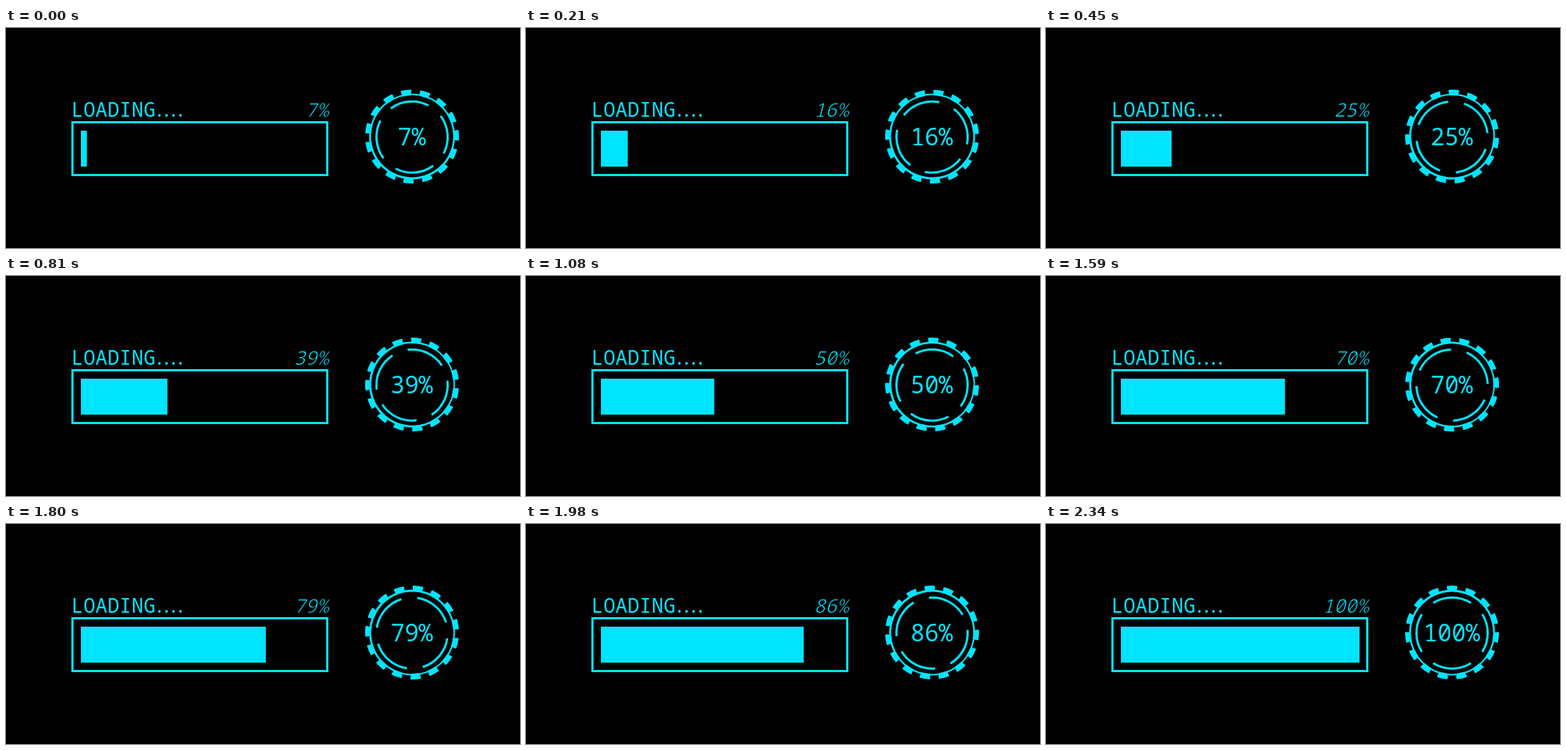
Write an HTML page that moves like this. It is 700x300 px and loops after 2.71 s.

```html
<!DOCTYPE html>
<html lang="en">
<head>
<meta charset="utf-8">
<title>Loading</title>
<style>
  html, body { margin: 0; width: 100%; height: 100%; overflow: hidden; background: #000; }
  svg { display: block; width: 700px; height: 300px; fill: #00e5ff; }
  text { font-family: "Noto Sans Mono", "DejaVu Sans Mono", monospace; }
  .line { fill: none; stroke: #00e5ff; stroke-width: 3; }
  .title { font-size: 27px; letter-spacing: .2px; }
  .dots { letter-spacing: -6.6px; }
  .side { font-size: 26px; font-weight: 200; font-style: italic; text-anchor: end; stroke: #000; stroke-width: .7px; }
  .center { font-size: 32px; text-anchor: middle; }
</style>
</head>
<body>
<svg viewBox="0 0 700 300">
  <text class="title" x="89" y="121">LOADING<tspan class="dots" dx="-3">....</tspan></text>
  <text class="side" id="side" x="439" y="121"></text>
  <rect class="line" x="90.5" y="128.5" width="347" height="72"/>
  <rect id="bar" x="102" y="140" height="49"/>
  <g transform="translate(553 148)">
    <g id="gear">
      <path fill-rule="evenodd" d="M0-58.5a58.5 58.5 0 1 0 .01 0zM0-56.5a56 56 0 1 0 .01 0z"/>
    </g>
    <g id="arcs" class="line"></g>
  </g>
  <text class="center" id="center" x="552.5" y="160"></text>
</svg>
<script>
  const STEP = 30, STEPS = 78, LEAD = 2, LOOP = 2710;
  const $ = id => document.getElementById(id);

  function addCopies(parent, count, start, d) {
    for (let i = 0; i < count; i++) {
      const path = document.createElementNS("http://www.w3.org/2000/svg", "path");
      path.setAttribute("d", d);
      path.setAttribute("transform", `rotate(${start + i * 360 / count})`);
      parent.append(path);
    }
  }

  function arc(r, half) {
    const x = r * Math.sin(half * Math.PI / 180), y = -r * Math.cos(half * Math.PI / 180);
    return `M${-x} ${y}A${r} ${r} 0 0 1 ${x} ${y}`;
  }

  addCopies($("gear"), 15, 12, "M-6-56L-7.3-62.5Q-7.4-63.5-6.4-63.6Q0-64.3 6.4-63.6Q7.4-63.5 7.3-62.5L6-56z");
  addCopies($("arcs"), 4, 0, arc(48.5, 32));

  function draw(now) {
    const step = Math.min(STEPS, Math.floor(now % LOOP / STEP));
    const p = (step + LEAD) / (STEPS + LEAD);
    const label = Math.round(5 + 95 * p) + "%";
    $("side").textContent = $("center").textContent = label;
    $("bar").setAttribute("width", 325 * p);
    $("gear").setAttribute("transform", `rotate(${180 * p})`);
    $("arcs").setAttribute("transform", `translate(0 .7) rotate(${-180 * p})`);
  }

  const start = performance.now();
  function tick() {
    draw(performance.now() - start);
    requestAnimationFrame(tick);
  }
  tick();
</script>
</body>
</html>
```
